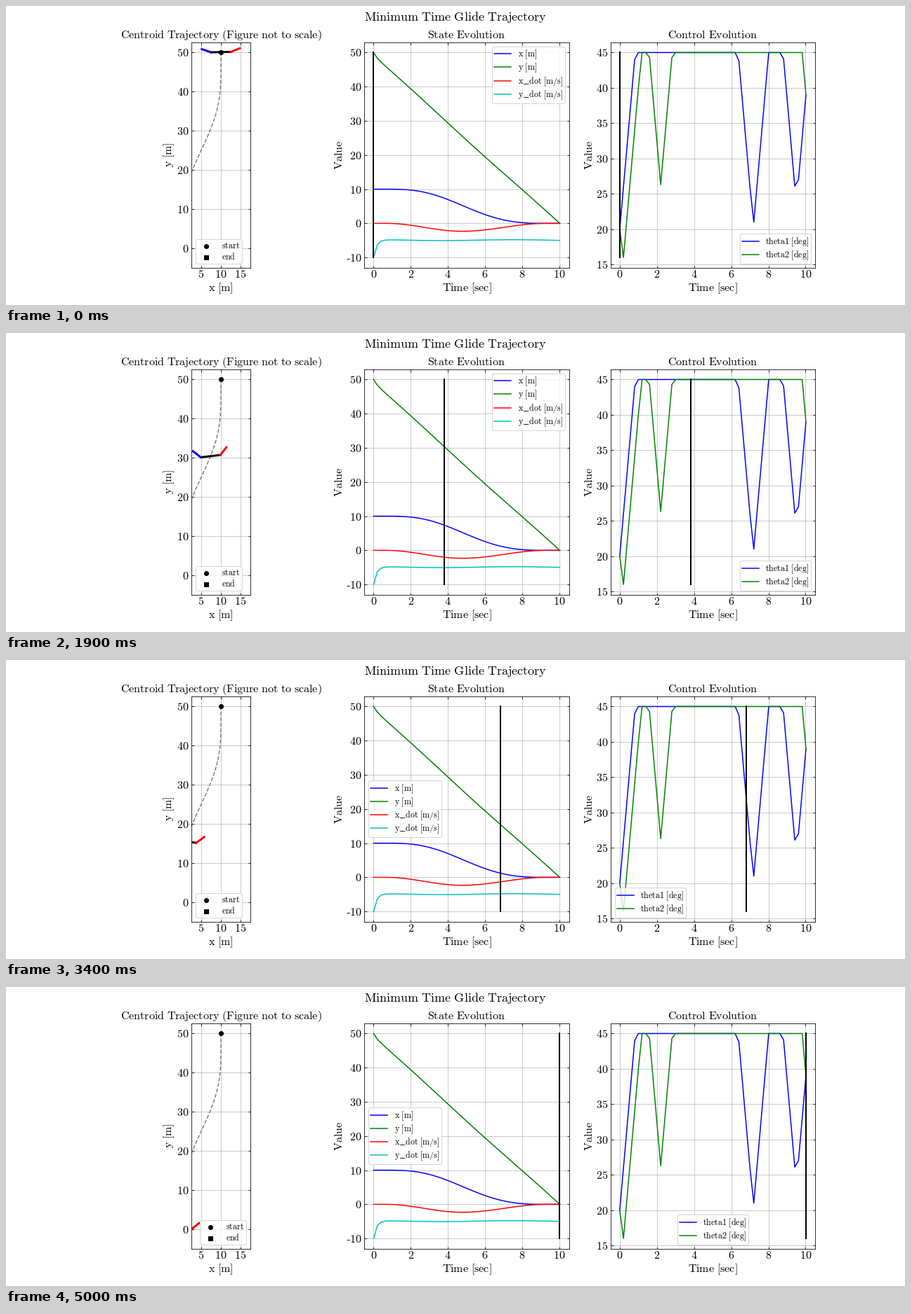
A matplotlib script that plays this animation: 1280 px wide and 427 px high, repeating every 5100 ms.

```python
import matplotlib.pyplot as plt
import numpy as np
from matplotlib.animation import FuncAnimation

W, H, DPI = 1280, 427, 72
STEPS, DT = 51, 0.2
SPAN, ARM, TURN_RATE, MAX_WING = 10.02, 2.5, 30, 45

plt.rcParams.update({
    "font.family": "Liberation Serif",
    "mathtext.fontset": "cm",
    "font.size": 16,
    "axes.titlesize": 16,
    "axes.labelpad": 1,
    "axes.grid": True,
    "grid.linewidth": 0.65,
    "xtick.direction": "in",
    "ytick.direction": "in",
    "xtick.major.pad": 2.5,
    "xtick.top": True,
    "ytick.right": True,
    "legend.fontsize": 12,
    "legend.borderpad": 0.25,
    "legend.labelspacing": 0.13,
})


def rm(text):
    """Upright Computer Modern text, with a wide underscore."""
    text = text.replace("_", r"\_\!\!\_").replace("-", "\u2010")
    return rf"$\mathrm{{{text}}}$".replace(" ", r"\ ")


def wing(t, *dips):
    """Wing angle held at its limit, leaving it at a fixed rate around each dip."""
    return np.min([np.full_like(t, MAX_WING)]
                  + [low + TURN_RATE * abs(t - at) for at, low in dips], axis=0)


def descend(rate, start):
    """Integrate a rate from start so that it ends at zero."""
    total = np.concatenate([[0], np.cumsum(rate[1:] + rate[:-1])])
    return start * (1 - total / total[-1])


# Flight data
t = np.arange(STEPS) * DT
time = np.linspace(0, SPAN, STEPS)

late = t - 4.75
phase = np.clip(late / np.where(late < 0, 4.1, 4.55), -1, 1)
vx = -2.32 * np.cos(np.pi / 2 * phase) ** 2
vy = -4.92 - 5.21 * np.exp(-t / 0.16) - 0.13 * np.cos(2 * np.pi * (t - 3.7) / 7.6)
x, y = descend(vx, 10), descend(vy, 50)

theta1 = wing(t, (0, 20), (7.18, 20.4), (9.485, 23.55))
theta2 = wing(t, (1 / 6, 15), (2.2, 26.3), (10, 39))
sway = (t - 4.65) / 1.75
tilt = np.radians(-9.5 * sway * np.exp((1 - sway ** 2) / 2))

fig = plt.figure(figsize=((W + 1e-6) / DPI, (H + 1e-6) / DPI), dpi=DPI)
fig.suptitle(rm("Minimum Time Glide Trajectory"), fontsize=18, y=0.985)


def panel(left, width, title, xlabel, ylabel, xticks, yticks):
    ax = fig.add_axes([left / W, 53.2 / H, width / W, 322 / H])
    ax.set_title(rm(title))
    ax.set_xlabel(rm(xlabel))
    ax.set_ylabel(rm(ylabel))
    ax.set_xticks(xticks, [rm(str(v)) for v in xticks])
    ax.set_yticks(yticks, [rm(str(v)) for v in yticks])
    return ax


def chart(left, title, yticks, curves, low, high):
    ax = panel(left, 291.6, title, "Time [sec]", "Value", range(0, 11, 2), yticks)
    for data, color, label in curves:
        ax.plot(time, data, color, label=rm(label + " "))
    bar, = ax.plot([0, 0], [low, high], "k", lw=2)
    pad_t, pad_v = 0.05 * SPAN, 0.05 * (high - low)
    ax.set_xlim(-pad_t, SPAN + pad_t)
    ax.set_ylim(low - pad_v, high + pad_v)
    return bar, ax.legend(loc="upper right")


path = panel(264, 84, "Centroid Trajectory (Figure not to scale)", "x [m]", "y [m]",
             range(5, 16, 5), range(0, 51, 10))
path.set_xlim(2.5, 17.5)
path.set_ylim(-5, 52.5)
path.plot(x, y, "--", color="gray")
path.scatter(x[0], y[0], 36, "k", marker="o", label=rm("start "), zorder=3)
path.scatter(x[-1], y[-1], 36, "k", marker="s", label=rm("end "), zorder=3)
body, left_wing, right_wing = (path.plot([], [], c, lw=3)[0] for c in "kbr")
path_key = path.legend(loc="lower left")

state_bar, state_key = chart(
    510.1, "State Evolution", range(-10, 51, 10),
    [(x, "b", "x [m]"), (y, "g", "y [m]"),
     (vx, "r", "x_dot [m/s]"), (vy, "c", "y_dot [m/s]")], -10, 50)
control_bar, control_key = chart(
    860.6, "Control Evolution", range(15, 46, 5),
    [(theta1, "b", "theta1 [deg]"), (theta2, "g", "theta2 [deg]")], 16, 45)


def reach(start, angle):
    return start + ARM * np.array([np.cos(angle), np.sin(angle)])


def draw(k):
    center = np.array([x[k], y[k]])
    ahead, back = tilt[k], tilt[k] + np.pi
    left, right = reach(center, back), reach(center, ahead)
    left_tip = reach(left, back - np.radians(theta1[k]))
    right_tip = reach(right, ahead + np.radians(theta2[k]))
    for line, ends in ((body, (left, right)), (left_wing, (left, left_tip)),
                       (right_wing, (right, right_tip))):
        line.set_data(*np.transpose(ends))
    for bar in (state_bar, control_bar):
        bar.set_xdata([time[k]] * 2)

    # Keys step aside for the moving parts
    path_key.set_loc("lower left" if k < 49 else "lower right")
    state_key.set_loc("upper right" if k < 32 else "center left")
    control_key.set_loc("lower right" if k < 32 else
                        "lower left" if k < 35 else "lower center")
    return body, left_wing, right_wing, state_bar, control_bar


anim = FuncAnimation(fig, draw, frames=STEPS, interval=100, repeat=True,
                     repeat_delay=0, blit=False)
plt.show()
```
